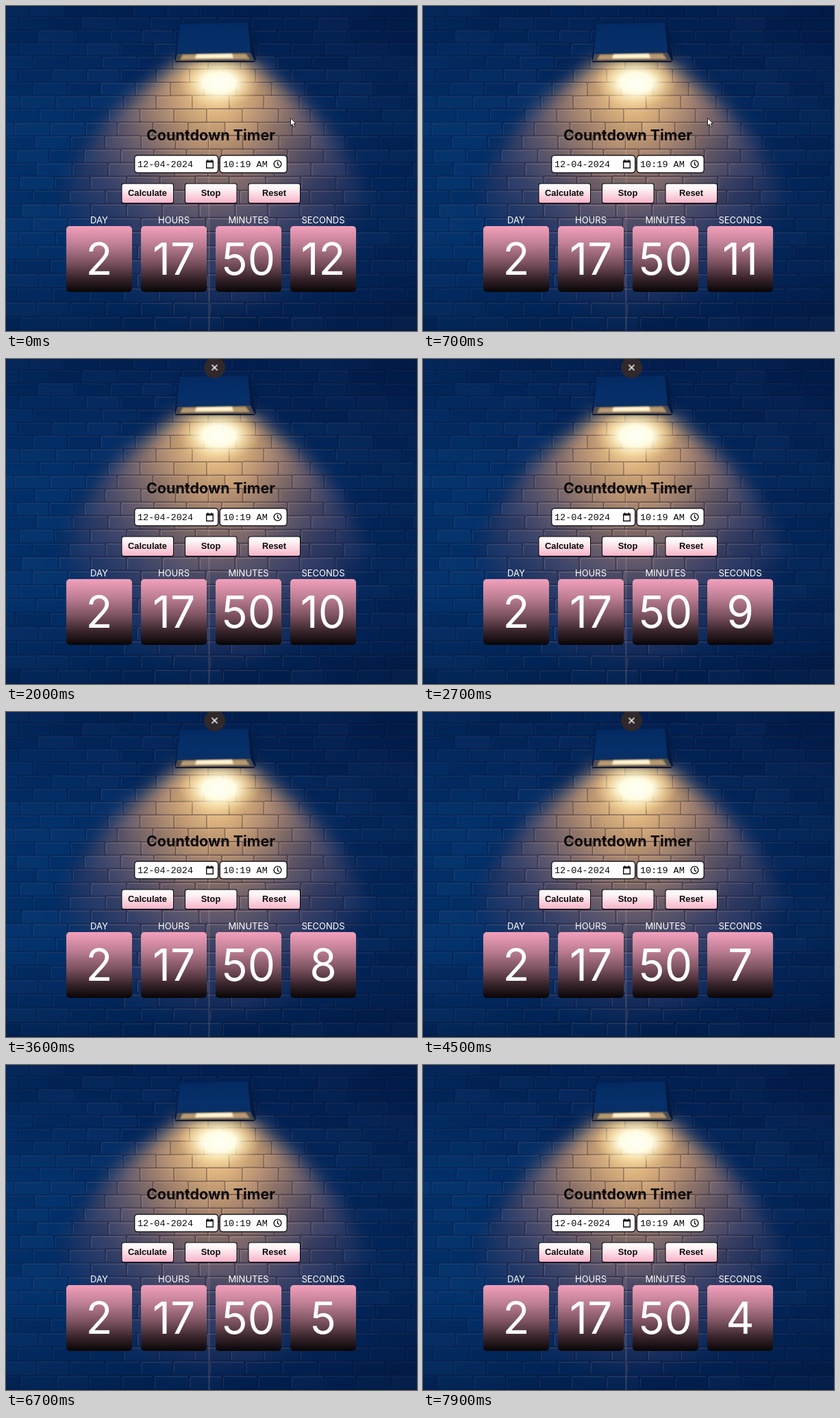
Animation, 600 px wide and 474 px high, one loop 8 s. Source, as an HTML page with a canvas:

```html
<!DOCTYPE html>
<html lang="en">
<head>
<meta charset="utf-8">
<title>Countdown Timer</title>
<style>
  html, body { margin: 0; width: 100%; height: 100%; overflow: hidden; background: #03265c; }
  .stage { position: absolute; left: 0; top: 0; width: 600px; height: 474px; overflow: hidden; }
  .stage > canvas, .stage > svg { position: absolute; left: 0; top: 0; }
  .title { font: 700 21.5px Inter, sans-serif; fill: #0a0808; }
  .field { font: 13.5px "Liberation Mono", monospace; fill: #0c0c0c; }
  .button { font: 700 12.8px "Liberation Sans", Arial, sans-serif; fill: #0a0a0a; }
  .title, .button { text-anchor: middle; }

  .unit { position: absolute; top: 303px; width: 96px; text-align: center; color: #fff;
          font: 13px/18px Inter, sans-serif; }
  .card { height: 96px; border-radius: 5px; font-size: 64px; line-height: 96px;
          background: linear-gradient(#f3a0bb, #bd7e93 28%, #7d5361 55%, #36232a 80%, #080506); }

  .seconds::after { content: "12"; animation: count 8s step-end infinite; }
  @keyframes count {
    0%     { content: "12"; }
    6.2%   { content: "11"; }
    18.7%  { content: "10"; }
    29.9%  { content: "9"; }
    42.4%  { content: "8"; }
    54.9%  { content: "7"; }
    67.4%  { content: "6"; }
    79.9%  { content: "5"; }
    93.6%, 100% { content: "4"; }
  }

  .pointer { animation: leave 8s linear infinite; }
  @keyframes leave {
    0%, 19.5% { transform: translate(415px, 163px); }
    22.5%, 100% { transform: translate(340px, -24px); }
  }

  .close { transform: translate(304.5px, -22px); animation: slide 8s ease-out infinite; }
  @keyframes slide {
    0%, 22% { transform: translate(304.5px, -22px); }
    25%, 58% { transform: translate(304.5px, 12.5px); }
    61%, 100% { transform: translate(304.5px, -22px); }
  }
</style>
</head>
<body>
<div class="stage">
  <canvas id="wall" width="600" height="474"></canvas>

  <svg width="600" height="474" viewBox="0 0 600 474">
    <defs>
      <linearGradient id="metal" x1="0" y1="0" x2="0" y2="1">
        <stop offset="0" stop-color="#032a62"/>
        <stop offset=".7" stop-color="#06306a"/>
        <stop offset="1" stop-color="#0a2f62"/>
      </linearGradient>
      <linearGradient id="blush" x1="0" y1="0" x2="0" y2="1">
        <stop offset="0" stop-color="#fff"/>
        <stop offset=".3" stop-color="#fdf0f3"/>
        <stop offset="1" stop-color="#f8b3c8"/>
      </linearGradient>
      <filter id="soft" x="-50%" y="-100%" width="200%" height="300%">
        <feGaussianBlur stdDeviation="1.2"/>
      </filter>
      <filter id="shade" x="-50%" y="-50%" width="200%" height="200%">
        <feGaussianBlur stdDeviation="5"/>
      </filter>
    </defs>

    <!-- lamp -->
    <path d="M256 24 H360 L374 76 H250 Z" fill="#021a45" opacity=".6" filter="url(#shade)"/>
    <path d="M254 26 L353 24 L357 30 L365 79 L361 82 L248 82 L246 78 Z" fill="#041a42"/>
    <path d="M254 26 L353 24 L357 68 L249 70 Z" fill="url(#metal)"/>
    <path d="M250 70 L357 68 L363 80 L247 81 Z" fill="#4d4a4f"/>
    <path d="M258 71 L350 69.5 L356 77.5 L254 78.5 Z" fill="#b99a70" filter="url(#soft)"/>
    <path d="M278 70.5 L330 69.5 L332 76 L276 76.5 Z" fill="#fff4d2" filter="url(#soft)"/>
    <path d="M247 81 H363" stroke="#15161f" stroke-width="1.6"/>

    <text class="title" x="299" y="196">Countdown Timer</text>

    <!-- date and time fields -->
    <g fill="#fff" stroke="#161318" stroke-width="1.4">
      <rect x="187.7" y="217.7" width="122" height="25.6" rx="4.5"/>
      <rect x="312.2" y="217.7" width="98" height="25.6" rx="4.5"/>
    </g>
    <text class="field" x="192" y="235">12-04-2024</text>
    <text class="field" x="317" y="235">10:19 AM</text>
    <g fill="none" stroke="#111" stroke-width="1.4">
      <path d="M292.7 226.2 H302.3 V236.3 H292.7 Z M294.7 224 V226 M300.3 224 V226"/>
      <path d="M292.5 227 H302.5" stroke-width="2.6"/>
      <circle cx="396.5" cy="230.5" r="5.4"/>
      <path d="M396.5 227 V231 L399 232.6"/>
    </g>

    <g id="buttons"></g>
  </svg>

  <div id="units"></div>

  <svg width="600" height="474" viewBox="0 0 600 474">
    <path class="pointer" d="M.5 .5 V11.6 L3 9.3 L4.9 13.4 L6.8 12.5 L5 8.6 H8.4 Z"
          fill="#fff" stroke="#111" stroke-width=".9"/>
    <g class="close">
      <circle r="15.5" fill="#31282c"/>
      <path d="M-4 -4 L4 4 M4 -4 L-4 4" stroke="#fff" stroke-width="1.6"/>
    </g>
  </svg>
</div>

<script>
  const W = 600, H = 474;
  const ctx = document.getElementById('wall').getContext('2d');

  let seed = 17;
  const random = () => (seed = (seed * 16807) % 2147483647) / 2147483647;

  function fade(gradient, stops) {
    stops.forEach(([at, color]) => gradient.addColorStop(at, color));
    return gradient;
  }
  const radial = (r, stops) => fade(ctx.createRadialGradient(0, 0, 0, 0, 0, r), stops);

  function line(x1, y1, x2, y2, color, width) {
    ctx.strokeStyle = color;
    ctx.lineWidth = width;
    ctx.beginPath();
    ctx.moveTo(x1, y1);
    ctx.lineTo(x2, y2);
    ctx.stroke();
  }

  function paintNight() {
    ctx.fillStyle = fade(ctx.createLinearGradient(0, 0, W, 0),
      [[0, '#02326c'], [.5, '#022c66'], [1, '#022456']]);
    ctx.fillRect(0, 0, W, H);
    ctx.fillStyle = fade(ctx.createLinearGradient(0, 0, 0, H),
      [[0, 'rgba(0,14,52,.4)'], [.35, 'rgba(0,14,52,0)'], [.7, 'rgba(0,14,52,0)'], [1, 'rgba(0,12,40,.35)']]);
    ctx.fillRect(0, 0, W, H);
  }

  // A tent-shaped cone whose colour cools with distance from the lamp.
  function paintLight() {
    ctx.save();
    ctx.filter = 'blur(13px)';
    ctx.beginPath();
    ctx.moveTo(262, 76);
    ctx.lineTo(206, 118);
    ctx.quadraticCurveTo(115, 180, 70, 300);
    ctx.lineTo(30, 500);
    ctx.lineTo(575, 500);
    ctx.lineTo(535, 300);
    ctx.quadraticCurveTo(490, 180, 402, 118);
    ctx.lineTo(350, 76);
    ctx.translate(306, 112);
    ctx.scale(.78, 1);
    ctx.fillStyle = radial(350, [
      [0, '#fff3cc'], [.06, '#f9dfa6'], [.12, '#e6bb80'], [.25, '#bd9672'],
      [.38, 'rgba(150,121,107,.96)'], [.53, 'rgba(112,95,106,.85)'],
      [.7, 'rgba(80,74,104,.66)'], [.86, 'rgba(55,60,100,.5)'], [1, 'rgba(35,50,95,0)']
    ]);
    ctx.fill();
    ctx.restore();
  }

  // Each brick gets its own tone, a dark joint and a lit lip.
  function paintBricks() {
    const brickW = 50;
    let y = -3, h;
    for (let r = 0; y < H; r++, y += h) {
      h = 18.8 + y / 210;
      let x = -60 + (r % 2) * brickW / 2 + random() * 8;
      while (x < W) {
        const w = brickW + random() * 8 - 4;
        const dx = (x + w / 2 - 305) / 190, dy = (y - 260) / 190;
        const lit = Math.exp(-dx * dx - dy * dy);
        const tilt = random() * 1.2 - .6;
        const tone = random() - .5;
        ctx.fillStyle = tone > 0
          ? `rgba(180,165,190,${tone * .05})` : `rgba(0,8,35,${-tone * .16})`;
        ctx.fillRect(x, y, w, h);
        const dark = `rgba(22,16,38,${.2 + lit * .24})`;
        const lip = `rgba(240,195,180,${.03 + lit * .26})`;
        line(x + 1, y + tilt, x + w, y, dark, 1.7);
        line(x + 2, y + 2 + tilt, x + w - 2, y + 2, lip, 1.3);
        line(x, y, x + tilt, y + h, dark, 1.5);
        line(x + 2, y + 3, x + 2 + tilt, y + h - 2, lip, 1.1);
        x += w;
      }
    }
  }

  function paintGlow() {
    ctx.save();
    ctx.translate(311, 112);
    ctx.scale(1, .62);
    ctx.fillStyle = radial(60, [
      [0, '#fffff6'], [.4, 'rgba(255,253,230,.98)'], [.64, 'rgba(255,239,190,.55)'], [1, 'rgba(245,210,140,0)']
    ]);
    ctx.fillRect(-60, -60, 120, 120);
    ctx.restore();
    line(296.5, 150, 296.5, H, 'rgba(235,185,160,.2)', 2);
  }

  paintNight();
  paintLight();
  paintBricks();
  paintGlow();

  document.getElementById('buttons').innerHTML =
    [['Calculate', 206.5], ['Stop', 299], ['Reset', 391.5]].map(([label, x]) => `
      <rect x="${x - 38}" y="258.5" width="76.5" height="29.8" rx="3" fill="#08060a"/>
      <rect x="${x - 37}" y="259.5" width="74.5" height="27.5" rx="2.5" fill="url(#blush)"/>
      <text class="button" x="${x}" y="277">${label}</text>`).join('');

  document.getElementById('units').innerHTML =
    [['DAY', 2], ['HOURS', 17], ['MINUTES', 50], ['SECONDS', '']].map(([label, n], i) => `
      <div class="unit" style="left:${88 + i * 109}px">${label}
        <div class="card${n ? '' : ' seconds'}">${n}</div></div>`).join('');
</script>
</body>
</html>
```
